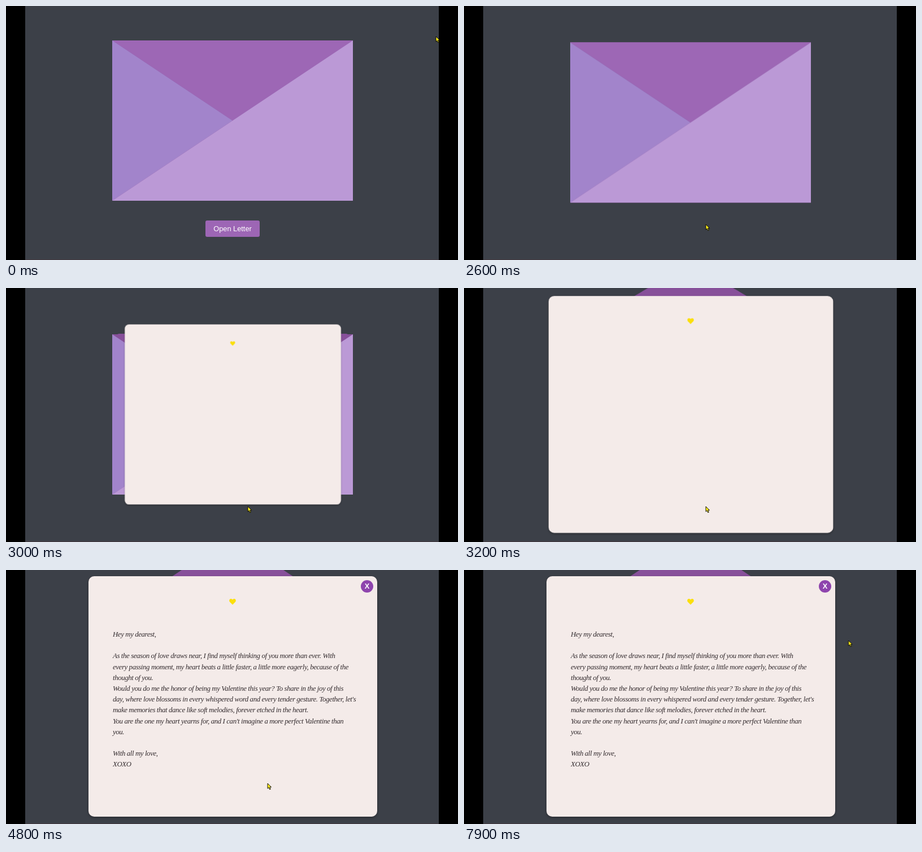
Animation of 800x450 px, one loop 8 s. Source, as an HTML page:

```html
<!DOCTYPE html>
<html lang="en">
<head>
<meta charset="utf-8">
<title>Open Letter</title>
<style>
  html, body { margin: 0; width: 100%; height: 100%; overflow: hidden; background: #000; }
  #stage {
    --t: 0;
    position: relative; width: 800px; height: 450px; overflow: hidden;
    font-family: "Liberation Sans", Arial, sans-serif;
  }
  #stage * { position: absolute; box-sizing: border-box; }

  /* Animations stay paused; the script picks the moment through --t. */
  .anim {
    animation: 8s linear infinite paused;
    animation-delay: calc(var(--t) * -1ms);
  }

  .page {
    left: 34px; top: 0; width: 732px; height: 450px; overflow: hidden;
    background: #3c4048; border-bottom: 1px solid #43383e;
  }

  .envelope { left: 188px; top: 61px; width: 426px; height: 284px; animation-name: settle; }
  .envelope div { inset: 0; }
  .inside { background: #87509a; }
  .envelope .flap {
    bottom: 50%; background: #9d67b5;
    clip-path: polygon(0 0, 100% 0, 50% 100%);
    transform-origin: top; animation-name: unfold, turn;
  }
  .left { background: #a284cb; clip-path: polygon(0 0, 50% 50%, 0 100%); }
  .right { background: #bb99d6; clip-path: polygon(100% 0, 100% 100%, 0 100%); }

  .open {
    left: 353px; top: 380px; width: 96px; height: 29px; border-radius: 3px;
    background: #9d66b5; color: #fff;
    font-size: 12.8px; line-height: 29px; text-align: center;
    animation-name: press;
  }

  .letter {
    left: 146px; top: 11px; width: 511px; height: 426px; border-radius: 10px;
    background: #f4ebe9; box-shadow: 0 2px 4px rgba(0, 0, 0, .3);
    animation-name: grow;
  }
  .heart { left: 249px; top: 40px; width: 12px; height: 10.5px; fill: #fbdf0a; }
  .content { inset: 0; animation-name: reveal; }
  .text {
    left: 43px; top: 94px; margin: 0; white-space: pre; color: #342c2f;
    font: italic 12.8px/19.2px "Liberation Serif", "Times New Roman", serif;
    letter-spacing: -.38px;
  }
  .close {
    left: 482px; top: 7px; width: 22px; height: 22px; border-radius: 50%;
    background: #8e44ad; color: #fff;
    font-size: 12.8px; font-weight: 600; line-height: 22px; text-align: center;
  }

  .cursor { left: 0; top: 0; width: 10px; height: 14px; overflow: visible; animation-name: point; }
  .cursor path { fill: #ffee1c; stroke: #000; stroke-width: .9; stroke-linejoin: round; }

  @keyframes settle {
    0%, 31.25% { transform: none; animation-timing-function: ease-in-out; }
    35.75%, 100% { transform: translateY(21px); }
  }
  @keyframes unfold {
    0%, 34.45% { transform: rotateX(0deg); animation-timing-function: ease; }
    44.45%, 100% { transform: rotateX(180deg); }
  }
  @keyframes turn {
    0% { background: #9d67b5; animation-timing-function: step-end; }
    37.4%, 100% { background: #87509a; }
  }
  @keyframes press {
    0%, 27.5% { transform: none; }
    28.75%, 100% { transform: scale(1.1); }
    30% { opacity: 1; }
    32%, 100% { opacity: 0; }
  }
  @keyframes grow {
    0%, 34.625% { transform: scale(0); animation-timing-function: ease; }
    41%, 100% { transform: none; }
  }
  @keyframes reveal {
    0% { opacity: 0; animation-timing-function: step-end; }
    47.5% { opacity: .5; animation-timing-function: step-end; }
    48.75%, 100% { opacity: 1; }
  }
  /* Smooth until the letter opens, then in jumps. */
  @keyframes point {
    0%, 6.25% { transform: translate(761px, 54px); }
    18.75% { transform: translate(723px, 268px); }
    23.75% { transform: translate(590px, 350px); }
    28.75% { transform: translate(428px, 387px); animation-timing-function: step-end; }
    53.75% { transform: translate(443px, 383px); animation-timing-function: step-end; }
    55% { transform: translate(459px, 379px); animation-timing-function: step-end; }
    60% { transform: translate(463px, 378px); animation-timing-function: step-end; }
    61.25% { transform: translate(501px, 368px); animation-timing-function: step-end; }
    66.25% { transform: translate(540px, 360px); animation-timing-function: step-end; }
    67.5% { transform: translate(578px, 351px); animation-timing-function: step-end; }
    73.75% { transform: translate(585px, 349px); animation-timing-function: step-end; }
    80% { transform: translate(612px, 323px); animation-timing-function: step-end; }
    81.25% { transform: translate(641px, 297px); animation-timing-function: step-end; }
    86.25% { transform: translate(642px, 296px); animation-timing-function: step-end; }
    92.5% { transform: translate(661px, 220px); animation-timing-function: step-end; }
    93.75% { transform: translate(679px, 143px); animation-timing-function: step-end; }
    98.75%, 100% { transform: translate(680.5px, 125px); }
  }
</style>
</head>
<body>
<div id="stage">
  <div class="page"></div>
  <div class="envelope anim">
    <div class="inside"></div>
    <div class="flap anim"></div>
    <div class="left"></div>
    <div class="right"></div>
  </div>
  <div class="open anim">Open Letter</div>
  <div class="letter anim">
    <svg class="heart" viewBox="0 0 24 21"><path d="M12 21 2 11C-1 7.500 0 0 6.500 0 9 0 11 1.500 12 3.500 13 1.500 15 0 17.500 0 24 0 25 7.500 22 11Z"/></svg>
    <div class="content anim">
      <p class="text">Hey my dearest,

As the season of love draws near, I find myself thinking of you more than ever. With
every passing moment, my heart beats a little faster, a little more eagerly, because of the
thought of you.
Would you do me the honor of being my Valentine this year? To share in the joy of this
day, where love blossoms in every whispered word and every tender gesture. Together, let's
make memories that dance like soft melodies, forever etched in the heart.
You are the one my heart yearns for, and I can't imagine a more perfect Valentine than
you.

With all my love,
XOXO</p>
      <div class="close">X</div>
    </div>
  </div>
  <svg class="cursor anim" viewBox="0 0 10 14"><path d="M0 0V9.200L2.100 7.300 3.700 10.900 5.300 10.200 3.800 6.700H6.600Z"/></svg>
</div>
<script>
  const LOOP = 8000, STEP = 100;
  const stage = document.getElementById("stage");
  const start = performance.now();

  function tick() {
    const t = (performance.now() - start) % LOOP;
    stage.style.setProperty("--t", Math.floor(t / STEP) * STEP);
    requestAnimationFrame(tick);
  }
  tick();
</script>
</body>
</html>
```
